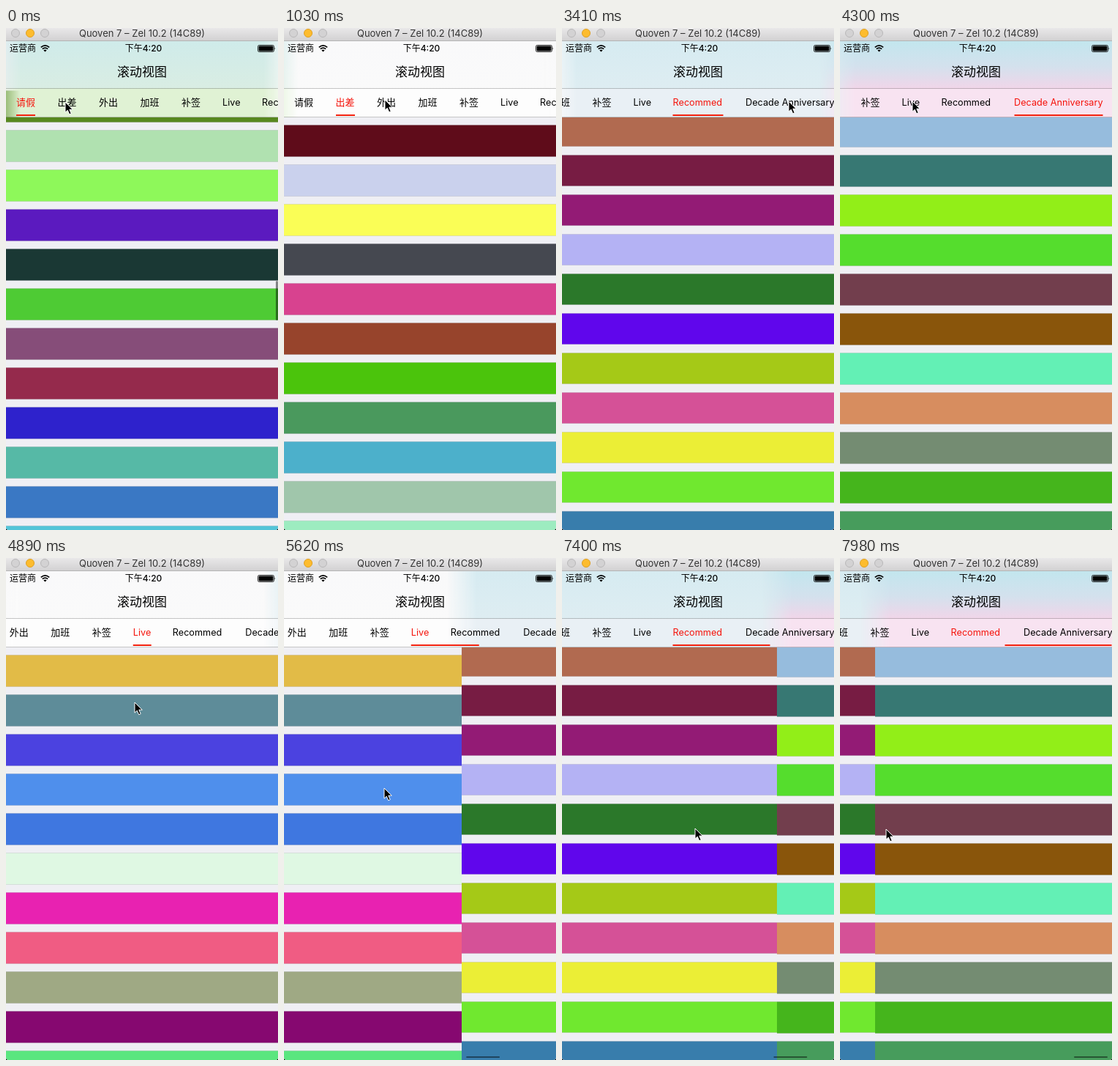
An HTML page that plays this animation: 372x685 px, repeating every 8 s.

```html
<!DOCTYPE html>
<html lang="zh-CN">
<head>
<meta charset="utf-8">
<style>
html, body { margin: 0; width: 100%; height: 100%; overflow: hidden; background: #000; }
#stage { position: absolute; left: 0; top: 0; width: 372px; height: 685px; overflow: hidden; background: #efeff4;
  border-radius: 0 0 4px 4px; color: #000; font-family: Inter, "Noto Sans CJK SC", "Noto Sans CJK", sans-serif; }
#stage div, #stage svg { position: absolute; }
.text { white-space: nowrap; line-height: 20px; }
.centered { left: 0; width: 372px; text-align: center; }
#strip { left: 0; top: 0; height: 685px; }
.page { top: 0; width: 372px; height: 685px; overflow: hidden; background: #efeff4; }
.bar { left: 0; width: 372px; box-sizing: border-box; border: solid rgba(205,204,209,.55); border-width: 1px 0; }
.tint { top: 0; width: 412px; height: 122px;
  -webkit-mask-image: linear-gradient(90deg, transparent, #000 40px); mask-image: linear-gradient(90deg, transparent, #000 40px); }
.rule { left: 0; width: 372px; height: 1px; background: rgba(0,0,0,.22); }
#chrome { left: 0; top: 0; width: 372px; height: 17px; background: linear-gradient(#e9e8e9, #d2d1d2); border-bottom: 1px solid #b4b4b4; }
.light { top: 1px; width: 10px; height: 10px; border: 1px solid #b9b8b9; border-radius: 50%; background: #d3d2d3; }
#tabs { left: 0; top: 83px; width: 584px; height: 38px; }
.tab { top: 8px; font-size: 13px; }
.tab.latin { top: 9px; font-size: 12.7px; }
#line { top: 35px; height: 2px; background: #f2220f; }
.thumb { background: rgba(0,0,0,.45); border-radius: 2px; }
</style>
</head>
<body>
<div id="stage">
  <div id="strip"></div>
  <div class="rule" style="top:82px"></div>
  <div class="rule" style="top:121px"></div>
  <div id="tabs"><div id="line"></div></div>
  <div id="chrome">
    <div class="light" style="left:7px"></div>
    <div class="light" style="left:27px;background:#fdbc2e;border-color:#dfa023"></div>
    <div class="light" style="left:47px"></div>
    <div class="text centered" style="top:-3px;font-size:13px;color:#333">Quoven 7 – Zel 10.2 (14C89)</div>
  </div>
  <div class="text" style="left:5px;top:18px;font-size:12px">运营商</div>
  <svg style="left:47px;top:23px" width="13" height="10" fill="none" stroke="#000" stroke-width="1.7">
    <path d="M.8 3.4Q6.5-1.5 12.2 3.4M2.8 5.7Q6.5 2.5 10.2 5.7"/>
    <path d="M6.5 9.6L4.4 7.4Q6.5 5.8 8.6 7.4Z" fill="#000" stroke="none"/>
  </svg>
  <div class="text centered" style="left:2px;top:18px;font-size:12px;font-weight:500">下午4:20</div>
  <svg style="left:344px;top:23px" width="26" height="11">
    <rect x=".5" y=".5" width="22" height="9" rx="1.8" fill="none" stroke="#000" stroke-width=".8"/>
    <rect x="1.6" y="1.6" width="19.8" height="6.8" rx="1"/>
    <path d="M23.6 3.2Q25 5 23.6 6.8Z"/>
  </svg>
  <div class="text centered" style="top:50px;font-size:17px;font-weight:500">滚动视图</div>
  <div class="thumb" id="vertical" style="left:369px;top:345px;width:2.5px;height:54px"></div>
  <div class="thumb" id="horizontal" style="left:0;top:679.5px;width:46px;height:2.5px"></div>
  <svg id="cursor" style="left:0;top:0" width="14" height="20">
    <path d="M1 1V15.2L4.3 12.2L6.7 17.8L9.2 16.7L6.8 11.2H11.3Z" stroke="#fff" stroke-width="1"/>
  </svg>
</div>
<script>
const LOOP = 8000, STEP = 147.8, WIDTH = 372;
const byId = id => document.getElementById(id);

// [label, left, width] in the unscrolled tab strip
const TABS = [
  ['请假', 14, 26], ['出差', 70.5, 26], ['外出', 127, 26], ['加班', 183.5, 26], ['补签', 240, 26],
  ['Live', 296, 24.5], ['Recommed', 350, 69], ['Decade Anniversary', 449.5, 121]
];

const WHITE = '#f9f9fa 17px,#fafafa 82px,#fdfdfd 83px';
const PAGES = [
  { top: 85, tint: '#cfebea 17px,#d9ede3 82px,#e0f2d4 83px',
    bars: '57881f b0e1b0 8ef85a 5b1abf 1a3834 4ecb34 864d79 952a4c 2e22cc 56b9a6 3a78c4 52c4d8' },
  { bars: '5f0c1a cad1ed fafe56 454850 d8428f 97442c 4bc40c 4a995d 4cb0cb a0c6ab 9decc0' },
  { bars: '3f8f9c d9a441 6a3fb0 a8d46a c2566b 2c5a3d e0c8d8 4766d0 b07a35 7fd0d6 962f86' },
  { tint: '#f6f6f8 17px,#f8f8fa 82px,#fdfdfd 83px',
    bars: '7589b8 5e8368 7b1a0b 8f6590 6d285d 1b2d8c e3e3d8 325d08 70dfbf d5d715 f39615' },
  { bars: '' },
  { bars: 'e2bb47 5e8c99 4b42e0 4f8fec 3f77e0 dff8e3 e822b1 f05c83 9fa984 860870 5ae67f' },
  { top: 119, height: 43, tint: '#d6ebf1 17px,#deedf2 82px,#e9f0f5 83px',
    bars: 'b16a50 771c43 931b75 b4b2f4 2b782a 6006ec a5c917 d55197 ebee36 70e82f 387dac' },
  { top: 119, tint: '#c2e6ee 17px,#d3e1ed 52px,#f0d6e9 82px,#f8e3f1 83px',
    bars: '96bcdd 377873 92ee18 55dd2d 723e4d 89550b 63f0b5 d78d5f 748c72 45b51c 479c5c' }
];

// [time, selected tab]
const SELECT = [[0, 0], [300, 1], [1250, 2], [1850, 3], [2700, 6], [3500, 7], [4480, 5], [6800, 6]];
// [time, pixels dragged past page 5]
const DRAG = [[5320, 0], [5616, 129], [5800, 206], [6000, 290], [6200, 337], [6500, 367], [6800, 372],
  [7250, 372], [7500, 512], [7600, 572], [7780, 648], [7980, 696]];
// [time, x, y]
const POINTER = [[0, 81, 101], [450, 81, 101], [900, 140, 98], [1330, 141, 98], [1650, 196, 100], [2050, 196, 100],
  [2450, 352, 100], [2900, 352, 100], [3250, 310, 100], [3650, 310, 100], [4150, 99, 100], [4600, 99, 100],
  [5200, 266, 310], [5320, 266, 310], [5616, 137, 314], [5800, 60, 326], [6510, 60, 326],
  [7100, 262, 368], [7250, 262, 368], [7600, 63, 370], [8000, 63, 370]];

const clamp = (v, lo = 0, hi = 1) => Math.min(hi, Math.max(lo, v));
const mix = (a, b, p) => a + (b - a) * p;
const ease = p => p * p * (3 - 2 * p);

function sample(keys, t, column = 1) {
  const i = keys.findIndex(k => k[0] > t);
  if (i === 0) return keys[0][column];
  if (i < 0) return keys[keys.length - 1][column];
  const a = keys[i - 1], b = keys[i];
  return mix(a[column], b[column], (t - a[0]) / (b[0] - a[0]));
}

function add(parent, className, style, text = '') {
  const el = document.createElement('div');
  el.className = className;
  el.textContent = text;
  Object.assign(el.style, style);
  parent.append(el);
  return el;
}

PAGES.forEach(({ top = 132, height = 44, bars }, i) => {
  const page = add(byId('strip'), 'page', { left: i * WIDTH + 'px' });
  bars.split(' ').filter(Boolean).forEach((color, n) =>
    add(page, 'bar', { top: top + n * 54 + 'px', height: height + 'px', background: '#' + color }));
});
// Header tints overlap so that neighbouring pages blend softly.
PAGES.forEach(({ tint = WHITE }, i) =>
  add(byId('strip'), 'tint', { left: i * WIDTH - 20 + 'px', background: `linear-gradient(${tint})` }));
const labels = TABS.map(([name, left], i) =>
  add(byId('tabs'), 'tab text' + (i > 4 ? ' latin' : ''), { left: left + 'px' }, name));

const span = i => [TABS[i][1], TABS[i][1] + TABS[i][2]];
const tabScroll = i => clamp(TABS[i][1] + TABS[i][2] / 2 - WIDTH / 2, 0, 211.5);

// The leading edge travels in the first half of a swipe, the trailing edge in the second.
function stretchedLine(position) {
  const i = Math.min(Math.floor(position), TABS.length - 2), p = position - i;
  const from = span(i), to = span(i + 1);
  return [mix(from[0], to[0], clamp(2 * p - 1)), mix(from[1], to[1], clamp(2 * p))];
}

function render(t) {
  const at = SELECT.filter(s => s[0] <= t).length - 1;
  const [since, tab] = SELECT[at];
  const before = SELECT[Math.max(0, at - 1)][1];
  const p = ease(clamp((t - since) / 300));
  const swiping = t >= DRAG[0][0];
  const position = swiping ? 5 + sample(DRAG, t) / WIDTH : tab;

  byId('strip').style.transform = `translateX(${-Math.round(position * WIDTH)}px)`;
  byId('tabs').style.transform = `translateX(${-mix(tabScroll(before), tabScroll(tab), p)}px)`;
  labels.forEach((el, i) => el.style.color = i === tab ? '#f5140c' : '#000');

  const [left, right] = swiping ? stretchedLine(position)
    : span(tab).map((edge, k) => mix(span(before)[k], edge, p));
  byId('line').style.left = left + 'px';
  byId('line').style.width = right - left + 'px';

  byId('vertical').style.opacity = tab === 0 ? 1 - clamp((t - 100) / 200) : 0;
  byId('horizontal').style.opacity = !swiping ? 0 : t < 7250 ? 1 - clamp((t - 6850) / 250) : 1;
  byId('horizontal').style.transform = `translateX(${position * WIDTH / 8 + .5}px)`;
  byId('cursor').style.transform =
    `translate(${Math.round(sample(POINTER, t, 1)) - 1}px,${Math.round(sample(POINTER, t, 2)) - 1}px)`;
}

const start = performance.now();
function tick() {
  const t = (performance.now() - start) % LOOP;
  render(Math.floor(t / STEP + .02) * STEP);
  requestAnimationFrame(tick);
}
render(0);
tick();
</script>
</body>
</html>
```
